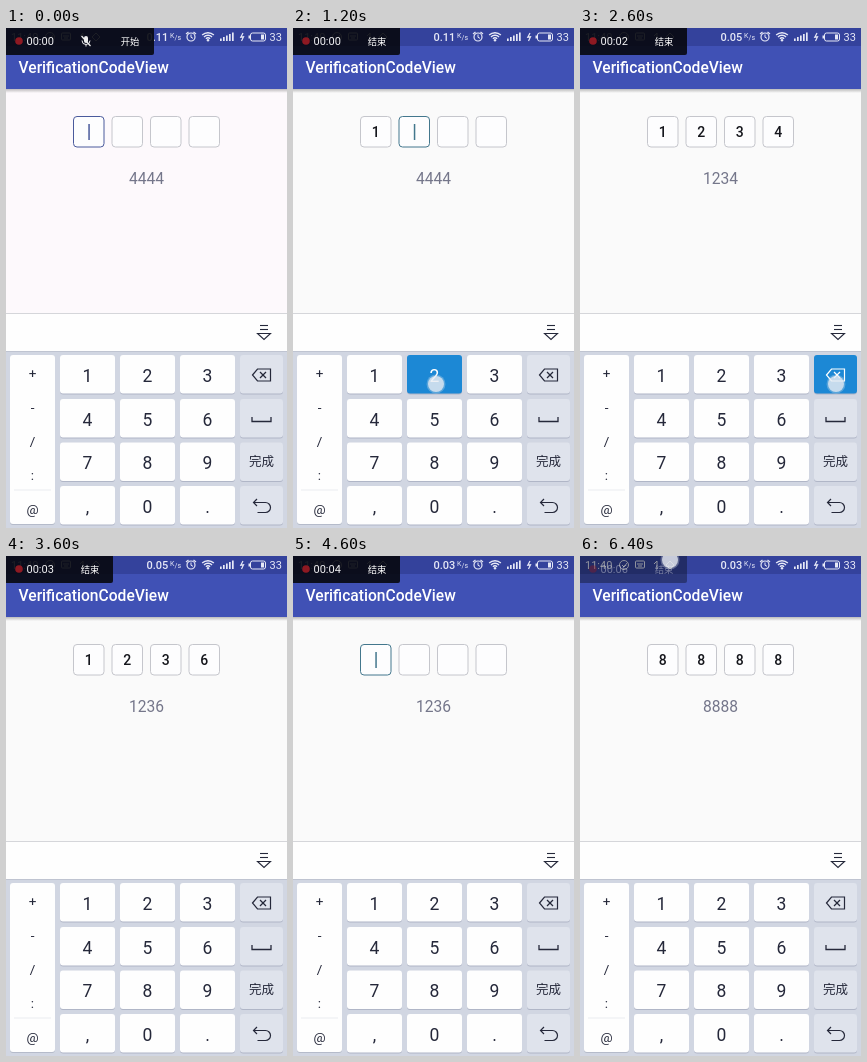
An HTML page with a canvas that plays this animation: 281x500 px, repeating every 6500 ms.

```html
<!DOCTYPE html>
<html lang="zh">
<head>
<meta charset="utf-8">
<title>Verification code</title>
<style>
html, body { margin: 0; width: 100%; height: 100%; overflow: hidden; background: #fafafa; }
canvas { display: block; width: 281px; height: 500px; }
</style>
</head>
<body>
<canvas id="stage"></canvas>
<script>
const LOOP = 6500, W = 281, H = 500;
const canvas = document.getElementById('stage');
const scale = window.devicePixelRatio || 1;
canvas.width = Math.round(W * scale);
canvas.height = Math.round(H * scale);
const c = canvas.getContext('2d');
const SANS = 'Roboto, "Noto Sans CJK SC", "Noto Sans CJK", sans-serif';
const INK = '#25283a';

// Key presses: down, up, key, touch x, touch y
const presses = [
  [700, 900, '1', 84, 357],
  [1050, 1250, '2', 143, 356],
  [1400, 1600, '3', 203, 357],
  [1900, 2100, '4', 83, 400],
  [2500, 2700, 'del', 256, 356],
  [3100, 3300, '6', 203, 400],
  [3850, 3950, 'del', 256, 356],
  [4050, 4150, 'del', 256, 356],
  [4230, 4330, 'del', 256, 356],
  [4430, 4530, 'del', 256, 356],
  [4850, 4980, '8', 143, 443],
  [5150, 5280, '8', 143, 443],
  [5450, 5580, '8', 143, 443],
  [5750, 5880, '8', 143, 443]
];
const cols = [[54, 55], [114, 55], [174, 55], [234, 43]];
const rows = [327, 371, 414.5, 458];
const keys = [
  ['1', '2', '3', 'del'],
  ['4', '5', '6', 'space'],
  ['7', '8', '9', '完成'],
  [',', '0', '.', 'back']
];

function rect(x, y, w, h, color) {
  c.fillStyle = color;
  c.fillRect(x, y, w, h);
}

function round(x, y, w, h, r, fill, stroke) {
  c.beginPath();
  c.roundRect(x, y, w, h, r);
  if (fill) { c.fillStyle = fill; c.fill(); }
  if (stroke) { c.strokeStyle = stroke; c.lineWidth = 1; c.stroke(); }
}

function text(s, x, y, size, color, align = 'left', weight = 400) {
  c.font = `${weight} ${size}px ${SANS}`;
  c.textAlign = align;
  c.fillStyle = color;
  c.fillText(s, x, y);
}

function line(points, color, width = 1, closed = false) {
  c.beginPath();
  points.forEach(([x, y], i) => i ? c.lineTo(x, y) : c.moveTo(x, y));
  if (closed) c.closePath();
  c.strokeStyle = color;
  c.lineWidth = width;
  c.stroke();
}

function arc(x, y, r, color, width = 1, from = 0, to = Math.PI * 2) {
  c.beginPath();
  c.arc(x, y, r, from, to);
  c.strokeStyle = color;
  c.lineWidth = width;
  c.stroke();
}

function disc(x, y, r, color) {
  c.beginPath();
  c.arc(x, y, r, 0, Math.PI * 2);
  c.fillStyle = color;
  c.fill();
}

function stateAt(t) {
  let code = '', result = '4444', down = null;
  for (const p of presses) {
    if (t >= p[1]) {
      code = p[2] === 'del' ? code.slice(0, -1) : code + p[2];
      if (code.length === 4) result = code;
    } else if (t >= p[0]) down = p;
  }
  return { code, result, down };
}

function statusBar(t) {
  const ink = '#e6e8f6';
  rect(0, 0, W, 18, '#34429c');
  text('11:40', 5, 13, 11, ink);
  arc(44, 9, 4.5, ink);
  line([[42, 9], [44, 11], [47, 7]], ink);
  round(55.5, 5, 9, 7, 1, null, ink);
  line([[57, 8], [63, 8]], ink);
  line([[58, 10], [62, 10]], ink);
  line([[77, 13], [77, 5], [74, 8]], ink);
  line([[86, 9], [90, 5], [94, 9], [90, 13]], ink, 1, true);

  const rate = t < 1300 ? '0.11' : t < 4100 ? '0.05' : '0.03';
  text(rate, 140.5, 13, 11, ink, 'left', 500);
  text('K', 164, 10, 7, ink);
  text('/s', 168.5, 12, 7, ink);

  arc(185, 9, 4, ink, 1.2);
  line([[185, 6.5], [185, 9.3], [187, 10.3]], ink);
  line([[180, 6], [182.5, 4]], ink, 1.3);
  line([[187.5, 4], [190, 6]], ink, 1.3);
  for (const r of [3, 5.7, 8.3]) arc(202, 13, r, ink, 1.4, -2.35, -0.79);
  disc(202, 12.3, 1.2, ink);
  for (let i = 0; i < 5; i++) {
    const h = 2.5 + i * 1.5;
    rect(214 + i * 3, 13 - h, 1.7, h, ink);
  }
  line([[237, 5], [234.8, 9.2], [237.5, 8.8], [235.5, 13]], ink, 1.2);
  round(244.5, 5, 15, 8, 2, null, ink);
  rect(242.5, 7.5, 1.7, 3, ink);
  rect(255, 6.5, 3, 5, ink);
  text('33', 263.5, 13, 11, ink);
}

function header() {
  rect(0, 18, W, 43, '#4051b5');
  text('VerificationCodeView', 12.5, 45, 15.6, '#fff', 'left', 500);
  const g = c.createLinearGradient(0, 61, 0, 65);
  g.addColorStop(0, 'rgba(0,0,0,.25)');
  g.addColorStop(1, 'rgba(0,0,0,0)');
  rect(0, 61, W, 4, g);
}

function recorder(t) {
  const idle = t < 200;
  const fade = Math.min(1, Math.max(0, (t - 6200) / 200));
  const sec = Math.max(0, Math.floor((t - 300) / 1000));
  c.globalAlpha = 0.9 - 0.52 * fade;
  round(0, 0, idle ? 148 : 107, 27, [0, 0, 2, 0], '#07080f');
  c.globalAlpha = 1 - 0.6 * fade;
  disc(13, 13, 3.8, '#8e1922');
  text('00:0' + sec, 20.5, 17, 11, '#f2f2f5');
  if (idle) {
    round(78, 8, 4, 7, 2, '#eee');
    arc(80, 12.5, 4, '#eee', 1, 0, Math.PI);
    line([[80, 16.5], [80, 18.5]], '#eee');
    line([[75.5, 8], [84.5, 18]], '#eee', 1.2);
    text('开始', 124, 16.5, 9.3, '#fff', 'center');
  } else {
    text('结束', 84, 16.5, 9.3, '#fff', 'center');
  }
  c.globalAlpha = 1;
}

function codeBoxes(s, t) {
  const active = t < 200 ? '#4a5a9c' : '#43778d';
  for (let i = 0; i < 4; i++) {
    const x = 67.5 + i * 38.5, on = i === s.code.length;
    round(x, 88.5, 30.5, 30.5, 3.5, '#fdfdfe', on ? active : '#c5c6cc');
    if (on) rect(x + 14.8, 96, 1.5, 16, active);
    else if (s.code[i]) text(s.code[i], x + 15.2, 109, 14, '#15161c', 'center', 500);
  }
  text(s.result, 140.5, 155.5, 15.6, '#74768a', 'center');
}

function icon(name, x, y, color) {
  if (name === 'del') {
    line([[x - 9, y], [x - 4, y - 6], [x + 9, y - 6], [x + 9, y + 6], [x - 4, y + 6]], color, 1.2, true);
    line([[x - 1.5, y - 3], [x + 4.5, y + 3]], color, 1.2);
    line([[x + 4.5, y - 3], [x - 1.5, y + 3]], color, 1.2);
  } else if (name === 'space') {
    line([[x - 9.5, y - 2], [x - 9.5, y + 2.5], [x + 9.5, y + 2.5], [x + 9.5, y - 2]], color, 1.3);
  } else {
    c.beginPath();
    c.moveTo(x - 8, y - 3.5);
    c.lineTo(x + 4, y - 3.5);
    c.arc(x + 4, y + 1.5, 5, -Math.PI / 2, Math.PI / 2);
    c.lineTo(x - 4, y + 6.5);
    c.strokeStyle = color;
    c.lineWidth = 1.2;
    c.stroke();
    line([[x - 4.5, y - 7], [x - 8, y - 3.5], [x - 4.5, y]], color, 1.2);
  }
}

function keyboard(down) {
  rect(0, 285, W, 38, '#fefefe');
  rect(0, 285, W, 1, '#d5d6da');
  line([[254, 297.5], [262, 297.5]], INK, 1.1);
  line([[254, 301.5], [262, 301.5]], INK, 1.1);
  line([[251.5, 305.5], [264.5, 305.5], [258, 311.5]], INK, 1.1, true);

  rect(0, 323, W, 177, '#d1d6e2');
  rect(0, 323, W, 1, '#bfc4d1');
  round(4, 328, 45, 169, 3, '#b5bbca');
  round(4, 327, 45, 169, 3, '#fefefe');
  rect(8, 461.5, 37, 1, '#eceef2');
  ['+', '-', '/', ':', '@'].forEach((s, i) => text(s, 26.5, 349.5 + i * 34.2, 13.5, INK, 'center'));

  rows.forEach((y, r) => cols.forEach(([x, w], k) => {
    const name = keys[r][k], hit = down && down[2] === name;
    const ink = hit ? '#fff' : INK, mx = x + w / 2;
    round(x, y + 1, w, 38.5, 3, '#b0b6c7');
    round(x, y, w, 38.5, 3, hit ? '#1c88d5' : k === 3 ? '#dfe3ec' : '#fefefe');
    if (name === '完成') text(name, mx, y + 23.5, 12.5, ink, 'center');
    else if (k === 3) icon(name, mx, y + 20, ink);
    else text(name, mx, y + 26.5, 17.5, ink, 'center');
  }));
}

function touch(x, y) {
  disc(x, y, 9.5, 'rgba(225,232,240,.3)');
  disc(x, y, 8, 'rgba(235,238,243,.75)');
}

function draw(t) {
  const s = stateAt(t);
  c.setTransform(scale, 0, 0, scale, 0, 0);
  rect(0, 0, W, H, t < 200 ? '#fdf9fc' : '#fafafa');
  statusBar(t);
  header();
  codeBoxes(s, t);
  keyboard(s.down);
  recorder(t);
  if (s.down) touch(s.down[3], s.down[4]);
  if (t >= 6250) touch(90, 4);
}

const start = performance.now();
function tick() {
  draw((performance.now() - start) % LOOP);
  requestAnimationFrame(tick);
}
tick();
</script>
</body>
</html>
```
